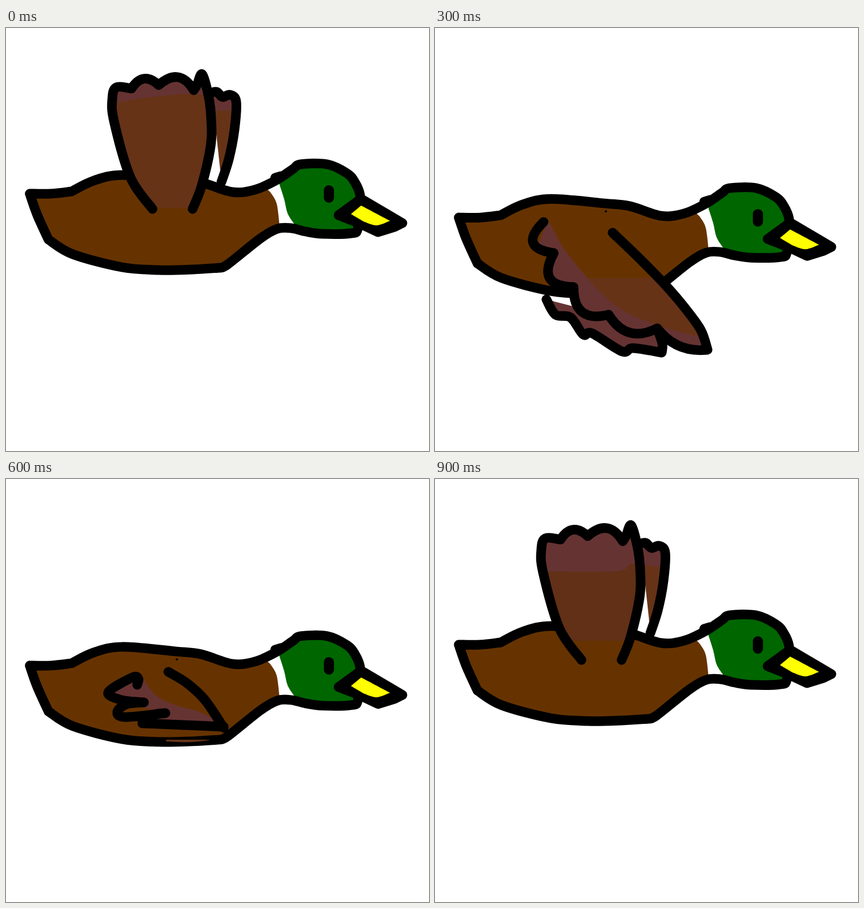
An HTML page that plays this animation: 748x748 px, repeating every 930 ms.

```html
<!DOCTYPE html>
<html lang="en">
<head>
<meta charset="utf-8">
<title>Flying duck</title>
<style>
  html, body { margin: 0; width: 100%; height: 100%; overflow: hidden; background: #fff; }
  svg { display: block; width: 100vw; height: 100vh; }
</style>
</head>
<body>
<svg id="stage" viewBox="0 0 748 748"></svg>
<script>
const BROWN = '#663300', WING = '#663317', TIP = '#663333', GREEN = '#006600';
const stage = document.getElementById('stage');
let clips = 0;

function add(parent, tag, attrs = {}) {
  const el = document.createElementNS('http://www.w3.org/2000/svg', tag);
  for (const k in attrs) el.setAttribute(k, attrs[k]);
  return parent.appendChild(el);
}

const points = text => text.trim().split(/\s+/).map(s => s.split(',').map(Number));
const move = (text, dx) => text.replace(/(\d+),/g, (_, x) => `${+x + dx},`);

// Smooth path through "x,y x,y ..."; "|" marks a sharp corner at the point before it.
function smooth(text) {
  let last = null, d = '';
  for (const part of text.split('|')) {
    const p = points(part);
    if (last) p.unshift(last);
    else d = 'M' + p[0];
    for (let i = 0; i < p.length - 1; i++) {
      const a = p[i - 1] || p[i], b = p[i], c = p[i + 1], e = p[i + 2] || c;
      const h1 = [0, 1].map(k => b[k] + (c[k] - a[k]) / 6);
      const h2 = [0, 1].map(k => c[k] - (e[k] - b[k]) / 6);
      d += `C${h1} ${h2} ${c}`;
    }
    last = p[p.length - 1];
  }
  return d;
}

// Feather edge: one bulge between each pair of cusps, sized by its chord.
function feathers(text, bulge) {
  const p = points(text);
  return p.slice(1).map(([x, y], i) => {
    const [u, v] = p[i], b = bulge(i);
    return `Q${(u + x) / 2 - (y - v) * b},${(v + y) / 2 + (x - u) * b} ${x},${y}`;
  }).join('');
}

const join = text => smooth(text).replace(/^M/, 'L');
const fill = (g, color, d) => add(g, 'path', { d, fill: color });
const ink = (g, d, width = 17, color = '#000') => add(g, 'path', {
  d, fill: 'none', stroke: color, 'stroke-width': width,
  'stroke-linecap': 'round', 'stroke-linejoin': 'round'
});

function clipped(g, d) {
  const id = 'clip' + clips++;
  add(add(g, 'clipPath', { id }), 'path', { d: d + 'Z' });
  return add(g, 'g', { 'clip-path': `url(#${id})` });
}

function body(back, belly, dx, dy) {
  const g = add(stage, 'g');
  const crown = move(' 508,249 521,241 568,241 603,257 617,273 626,295 624,312', dx);
  const chin = move('622,355 610,363 560,364 530,360 505,354 ', dx);
  const outline = smooth(back + crown + '|' + chin + belly);
  const inside = clipped(g, outline);
  const rightOf = curve => smooth(curve) + 'L520,400H700V200H470Z';
  fill(inside, BROWN, 'M0,0H748V748H0Z');
  fill(inside, '#fff', rightOf('463,286 470,294 479,312 484,352'));
  fill(inside, GREEN, rightOf('484,278 492,303 498,328 510,347'));
  ink(g, outline);

  const face = add(g, 'g', { transform: `translate(${dx} ${dy})` });
  const beak = 'M588,331L628,302L701,345L687,352L658,361L624,345Z';
  fill(face, '#000', beak);
  ink(face, beak);
  fill(face, '#ffff00', smooth('610,329|628,314|679,341|655,349 632,342|610,329'));
  ink(face, 'M571,287V300', 18);
  return g;
}

function glideBody() {
  const g = body('42,293 80,293 116,289|155,270 205,260 300,268 345,273 400,290 440,286 478,269',
    '480,355 450,372 392,418 378,424|330,427 270,428 205,423 118,400 75,374|55,330 42,293', 0, 0);
  ink(g, 'M476,265L486,262');
  add(g, 'circle', { cx: 302, cy: 282, r: 2 });
  return g;
}

function flapBody() {
  const g = body('58,278 101,291|160,271 215,263 270,261 320,264 365,276 416,292 445,284 494,263',
    '482,355 455,369 410,409 386,428 330,437 260,432 125,403 96,389 55,326 53,301 58,278', 11, 0);
  ink(g, 'M448,279L482,267', 18);
  ink(g, smooth('577,252 608,266 625,287'), 5, '#2b5a14');
  return g;
}

// Paint between two heights and one tip area, both held inside the outline.
function wing(g, outline, top, bottom, tip, color = WING) {
  const inside = clipped(g, outline);
  fill(inside, color, `M0,${top}H748V${bottom}H0Z`);
  fill(inside, TIP, tip);
  ink(g, outline);
}

function wingUp(late) {
  const g = add(stage, 'g');
  const above = curve => smooth(curve) + 'V0H170Z';
  const tip = above(late ? '170,163 320,163 350,150 420,160' : '170,144 215,128 310,117 362,119|362,146|420,146');
  wing(g, smooth('364,114 373,113 383,122 396,118 407,130 404,180 394,232 381,272'), 0, 266, tip);
  wing(g, smooth('259,320 220,264 191,165 188,125 195,105 222,107') +
    feathers('222,107 270,101 332,110', () => -0.6) +
    join('332,110|338,100 347,82 359,125 363,165 362,208 346,279 330,320'),
    0, late ? 286 : 318, tip, late ? '#613017' : WING);
  return g;
}

function wingHalf(late) {
  const g = add(stage, 'g');
  const tip = curve => smooth(curve) + 'H480V150Z';
  wing(g, smooth('388,202 410,205 432,211 433,240 446,257 402,287 362,302'), 0, 300, tip('385,220 400,245 416,272'));
  wing(g, smooth('198,337 217,260 237,223 268,199|310,180 362,170|360,186 349,196|364,190 379,200|380,234|398,236|374,272 350,306 300,343'),
    0, late ? 306 : 303, tip(move('298,190 338,235 362,278', late ? 14 : 0)));
  return g;
}

function wingForward() {
  const g = add(stage, 'g');
  wing(g, smooth('197,480 213,507 240,512 262,542 278,540 331,572 350,566 401,574|402,558 393,531'),
    0, 0, 'M190,463H240L262,505L410,531V600H190Z');
  wing(g, 'M192,343' + feathers('192,343 210,398 245,458 307,507 393,531 482,569', i => 1 - i * 0.18) +
    join('482,569|470,534 442,495 406,453 360,406 314,362'),
    442, 600, smooth('200,338 235,400 315,488 400,528 478,548') + 'V600H100Z');
  return g;
}

function wingDown() {
  const g = add(stage, 'g');
  fill(g, TIP, smooth('363,490|390,488|404,540 408,588|398,582') + 'Z');
  ink(g, smooth('396,476 400,494 410,560 413,593'));
  wing(g, 'M180,366' + feathers('180,366 191,430 207,499 265,550 335,598 404,637', () => 0.5) +
    join('404,637|400,600 385,560 352,490 305,399 288,386'),
    462, 700, smooth('188,358 219,430 260,525 315,563 398,605') + 'V700H100Z');
  return g;
}

function wingFolded() {
  const g = add(stage, 'g');
  fill(g, WING, 'M283,461H362Q330,468 283,464Z');
  fill(g, TIP, smooth('188,378|240,348|262,380 296,399 340,411 376,429|245,430|282,414|245,405|188,390') + 'Z');
  ink(g, smooth('232,364 234,353 223,351 181,377 205,391 244,395|214,398 197,411 210,421 282,414|260,417 241,432|385,438'));
  ink(g, smooth('287,341 320,361 352,391 385,440'));
  return g;
}

const FRAME = 30, COUNT = 31, LOW = 14, DROP = 59;
const bodies = [glideBody(), flapBody()];
const wings = [wingUp(false), wingHalf(false), wingForward(), wingDown(), wingFolded(), wingHalf(true), wingUp(true)];
const starts = [0, 2, 7, 14, 20, 25, 29];

const showOnly = (list, n) => list.forEach((el, i) => { el.style.display = i === n ? '' : 'none'; });

function draw(time) {
  const step = Math.floor(time / FRAME) % COUNT;
  const pose = starts.filter(s => s <= step).length - 1;
  const y = DROP * (step < LOW ? step / LOW : (COUNT - 1 - step) / (COUNT - 1 - LOW));
  showOnly(wings, pose);
  showOnly(bodies, pose % 2);
  bodies[pose % 2].setAttribute('transform', `translate(0 ${y})`);
}

let start = null;
function tick(now) {
  if (start === null) start = now;
  draw(Math.max(0, now - start));
  requestAnimationFrame(tick);
}
draw(0);
requestAnimationFrame(tick);
</script>
</body>
</html>
```
